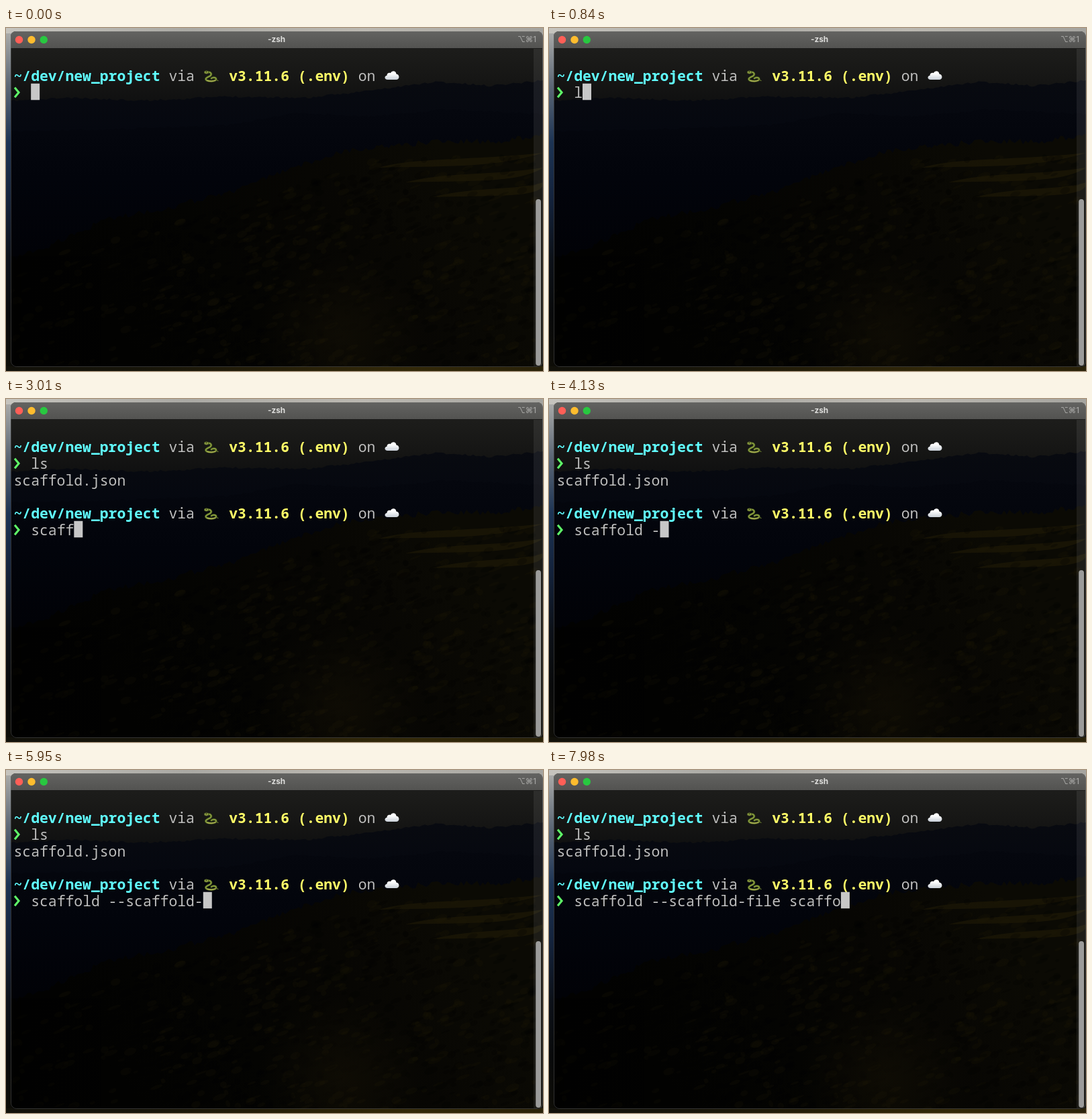
An HTML page with a canvas for the animation above (8 s loop, 800 px wide and 511 px high).

```html
<!DOCTYPE html>
<html lang="en">
<head>
<meta charset="utf-8">
<title>Terminal</title>
<style>
  html, body { margin: 0; width: 100%; height: 100%; overflow: hidden; background: #000; }
  canvas, svg { position: absolute; left: 0; top: 0; width: 800px; height: 511px; display: block; }
  .term { font: 400 21.38px "Noto Sans Mono", "DejaVu Sans Mono", monospace; fill: #bfbfbe; white-space: pre; font-variant-ligatures: none; }
  .path { font-weight: 700; fill: #60fdff; }
  .env { font-weight: 700; fill: #fffc67; }
  .title { font: 700 11.8px Inter, "Open Sans", sans-serif; fill: #dededc; text-anchor: middle; }
  .keys { font: 500 11.5px Inter, "DejaVu Sans", sans-serif; fill: #a3a3a1; text-anchor: end; }
</style>
</head>
<body>
<canvas id="land" width="800" height="511"></canvas>
<svg viewBox="0 0 800 511">
  <defs>
    <linearGradient id="bar" x2="0" y2="1">
      <stop offset="0" stop-color="#636361"/>
      <stop offset="1" stop-color="#535351"/>
    </linearGradient>
    <linearGradient id="puff" x2="0" y2="1">
      <stop offset=".3" stop-color="#fdfdfd"/>
      <stop offset="1" stop-color="#c9d0d8"/>
    </linearGradient>

    <path id="arrow" d="M13 88.8L19 96L13 103.2" fill="none" stroke="#5ffa68" stroke-width="3.1"/>

    <g id="snake" fill="none" stroke-linecap="round">
      <path d="M300 66C306 65 307 69 304 71.5C298 74 296 76 299 78C303 80 311 79.5 313 77C314 74 309 72.5 306 75" stroke="#37461b" stroke-width="3.4"/>
      <path d="M300 66C306 65 307 69 304 71.5C298 74 296 76 299 78C303 80 311 79.5 313 77C314 74 309 72.5 306 75" stroke="#869a3c" stroke-width="2"/>
      <path d="M300 78.6C304 79.8 309 79.4 312 78" stroke="#c9bd68" stroke-width=".8"/>
      <ellipse cx="298.6" cy="66" rx="3.3" ry="2.2" fill="#8a9a40" stroke="#4a5923" stroke-width=".6"/>
      <circle cx="298.4" cy="65.3" r=".7" fill="#15190b"/>
      <path d="M313 77L316 78.5" stroke="#65772d" stroke-width="1.3"/>
    </g>

    <path id="cloud" fill="url(#puff)" d="M568.5 77C563.5 77 563.2 71.4 567.5 70.8C567.2 67 571.2 66 573 67.2C574.8 62.8 581.2 63.6 581.4 68.5C586.7 69 587 77 581.2 77Z"/>

    <g id="prompt">
      <text class="path" x="11.5" y="79">~/dev/new_project</text>
      <text x="242.4" y="79">via</text>
      <use href="#snake"/>
      <text class="env" x="332.2" y="79">v3.11.6 (.env)</text>
      <text x="524.7" y="79">on</text>
      <use href="#cloud"/>
      <use href="#arrow"/>
    </g>
  </defs>

  <path d="M7 30V13Q7 5 15 5H791Q799.5 5 799.5 13V30Z" fill="url(#bar)"/>
  <path d="M7.5 30.5H799" stroke="#1b1b1a"/>
  <rect x="7.5" y="5.5" width="792" height="499" rx="8" fill="none" stroke="#6d6d6a" stroke-opacity=".45"/>
  <circle cx="19.5" cy="17.5" r="5.7" fill="#ff5f57"/>
  <circle cx="38" cy="17.5" r="5.7" fill="#febc2e"/>
  <circle cx="56.3" cy="17.5" r="5.7" fill="#28c840"/>
  <text class="title" x="403" y="21.3">-zsh</text>
  <text class="keys" x="790" y="20.5">⌥⌘1</text>

  <rect x="786" y="31" width="13" height="473" fill="#fff" opacity=".075"/>
  <rect x="789.2" y="255" width="7.8" height="248" rx="3.9" fill="#9b9b9a"/>

  <g class="term">
    <use href="#prompt"/>
    <text id="first" x="37.2" y="103.75"></text>
    <text id="listing" x="11.5" y="128.5">scaffold.json</text>
    <use id="next" href="#prompt" y="99"/>
    <text id="second" x="37.2" y="202.75"></text>
    <rect id="cursor" width="13" height="24.5" fill="#c7c7c7"/>
  </g>
</svg>
<script>
const LOOP = 8000, CELL = 12.83, ROW = 24.75, LEFT = 11.5;
const LIST_AT = 1470, PROMPT_AT = 1610;
const $ = id => document.getElementById(id);

const lines = [
  { el: $('first'), text: 'ls', keys: [840, 980] },
  { el: $('second'), text: 'scaffold --scaffold-file scaffo', keys: [
    2310, 2450, 2660, 2800, 3010, 3150, 3360, 3500, 3710, 4130, 4270,
    4550, 4690, 4970, 5110, 5250, 5390, 5530, 5740, 5950,
    6090, 6230, 6370, 6510, 6650, 6860, 7210, 7420, 7560, 7700, 7910] }
];

function typed({ el, text, keys }, t) {
  const n = keys.filter(k => k <= t).length;
  const shown = text.slice(0, n);
  if (el.textContent !== shown) el.textContent = shown;
  return n;
}

function show(el, on) {
  el.setAttribute('visibility', on ? 'visible' : 'hidden');
}

function render(t) {
  const [a, b] = lines.map(line => typed(line, t));
  show($('listing'), t >= LIST_AT);
  show($('next'), t >= PROMPT_AT);
  let col = 2 + a, row = 1;
  if (t >= PROMPT_AT) { col = 2 + b; row = 5; }
  else if (t >= LIST_AT) { col = 0; row = 3; }
  $('cursor').setAttribute('x', LEFT + col * CELL);
  $('cursor').setAttribute('y', 58 + row * ROW);
}

function paintLandscape() {
  const c = $('land').getContext('2d');
  let seed = 11;
  const rnd = () => (seed = seed * 16807 % 2147483647) / 2147483647;

  const fade = (x0, y0, x1, y1, ...colors) => {
    const g = c.createLinearGradient(x0, y0, x1, y1);
    colors.forEach((color, i) => g.addColorStop(i / (colors.length - 1), color));
    return g;
  };

  const box = (x, y, w, h, fill) => { c.fillStyle = fill; c.fillRect(x, y, w, h); };

  // Ridge through a few points, roughened, closed at the bottom edge.
  const ridge = (pts, rough, fill) => {
    c.beginPath();
    c.moveTo(0, 511);
    for (let i = 0; i < pts.length - 1; i++) {
      const [x0, y0] = pts[i], [x1, y1] = pts[i + 1];
      for (let x = x0; x < x1; x += 4) {
        c.lineTo(x, y0 + (y1 - y0) * (x - x0) / (x1 - x0) + (rnd() - .5) * rough);
      }
    }
    c.lineTo(800, pts[pts.length - 1][1]);
    c.lineTo(800, 511);
    c.fillStyle = fill;
    c.fill();
  };

  // Desktop edge around the window.
  box(0, 0, 800, 511, fade(0, 0, 0, 511, '#b0b0ad', '#5d6876', '#1d3454', '#14233c', '#0d121a', '#090a0b', '#0e0d07'));
  box(0, 0, 800, 8, fade(0, 0, 800, 0, '#c6c4be', '#aaa9a4', '#bbb8b1', '#a5a49f'));
  box(0, 504, 800, 7, fade(0, 0, 800, 0, '#12110a', '#17150a', '#261f09', '#332909', '#2a2209'));

  c.save();
  c.beginPath();
  c.roundRect(7, 5, 792.5, 500, 8);
  c.clip();
  box(0, 0, 800, 511, fade(0, 30, 0, 130, '#1d1d1b', '#151514', '#0c0d0e'));
  ridge([[0, 109], [90, 104], [210, 108], [330, 102], [450, 104], [560, 91], [640, 80], [720, 86], [800, 78]], 3,
    fade(0, 80, 0, 330, '#080a10', '#03060f', '#02040b'));
  ridge([[0, 154], [180, 150], [330, 145], [430, 126], [540, 132], [660, 121], [800, 128]], 3,
    fade(0, 120, 0, 330, '#05070e', '#02040b', '#010207'));
  ridge([[0, 348], [70, 322], [150, 285], [245, 267], [340, 242], [420, 211], [500, 184], [570, 176], [650, 168], [730, 170], [800, 158]], 9,
    fade(180, 470, 640, 170, '#020201', '#040402', '#070603', '#0b0a04'));

  // Grassy terraces on the upper right.
  for (let i = 0; i < 3; i++) {
    const x = 555 + i * 40, y = 208 + i * 22;
    c.beginPath();
    c.moveTo(x, y);
    c.bezierCurveTo(x + 60, y - 16, x + 130, y - 10, 800, y - 22);
    c.bezierCurveTo(x + 170, y + 2, x + 90, y - 3, x, y);
    c.fillStyle = 'rgba(43,37,9,.4)';
    c.fill();
  }

  // Tree crowns, lighter to the lower right.
  for (let i = 0; i < 1400; i++) {
    const x = rnd() * 790;
    const top = 345 - x * .29 + Math.max(0, x - 550) * .24;
    const y = top + 12 + rnd() * (495 - top);
    const lit = rnd() < .12 + .3 * x / 800;
    c.fillStyle = lit ? 'rgba(28,23,7,.22)' : 'rgba(0,0,0,.25)';
    c.beginPath();
    c.ellipse(x, y, 3 + rnd() * 8, 1.5 + rnd() * 4, -.35, 0, 7);
    c.fill();
  }
  const glow = c.createRadialGradient(500, 460, 5, 500, 460, 125);
  glow.addColorStop(0, 'rgba(34,27,8,.3)');
  glow.addColorStop(1, 'rgba(34,27,8,0)');
  box(360, 320, 320, 191, glow);
  box(0, 340, 260, 171, fade(0, 0, 260, 0, 'rgba(0,0,0,.55)', 'rgba(0,0,0,0)'));
  c.restore();
}

paintLandscape();
const start = performance.now();
function tick() {
  render((performance.now() - start) % LOOP);
  requestAnimationFrame(tick);
}
tick();
</script>
</body>
</html>
```
